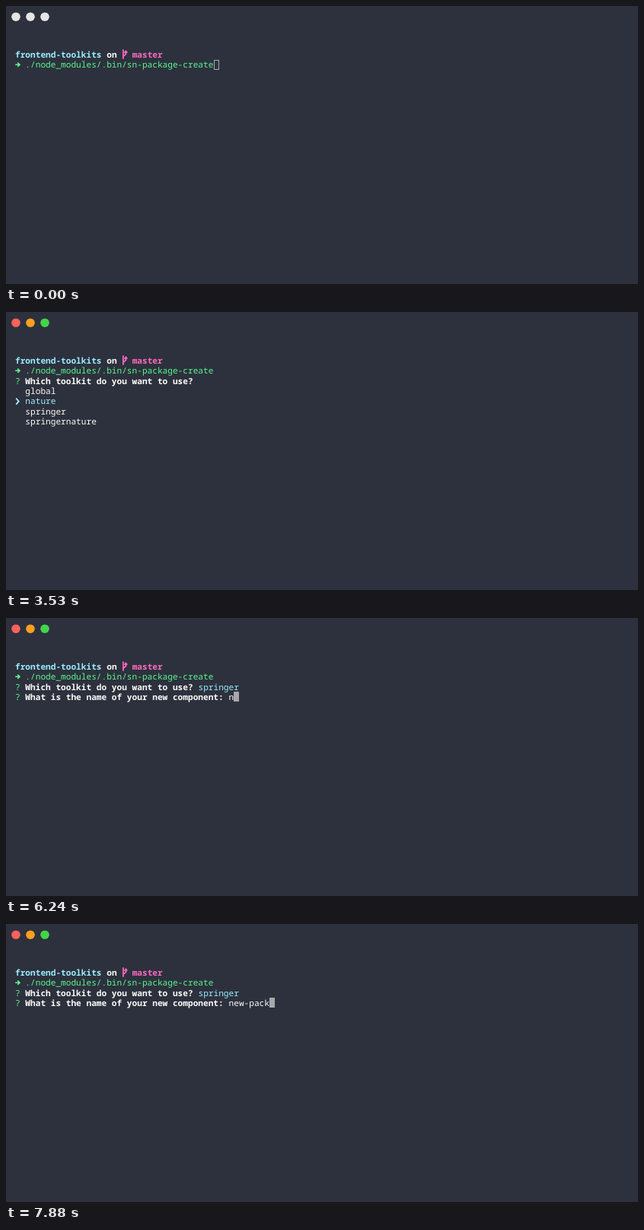
These frames come from a looping animation (830x366 px, 8 s). An HTML page:

```html
<!DOCTYPE html>
<html lang="en">
<head>
<meta charset="utf-8">
<title>Terminal</title>
<style>
html, body { margin: 0; width: 100%; height: 100%; overflow: hidden; background: #2d313d; }
svg { display: block; width: 830px; height: 366px; }
text { font: 500 11.13px "Noto Sans Mono", "DejaVu Sans Mono", monospace; white-space: pre; text-rendering: geometricPrecision; font-variant-ligatures: none; }
.bold { font-weight: 700; }
.light { font-weight: 400; }
</style>
</head>
<body>
<svg id="stage" viewBox="0 0 830 366"></svg>
<script>
const LOOP = 8000, LEFT = 12, CELL = 6.68, TOP = 68, ROW = 13.33;
const CYAN = '#9aedfe', GREEN = '#5af78e', PINK = '#ff6ac1', WHITE = '#fbfbf8', GREY = '#92949a', BLOCK = '#a7a8ab';
const stage = document.getElementById('stage');
const colX = col => LEFT + col * CELL;
const rowY = row => TOP + row * ROW;

function add(parent, tag, attrs, content) {
  const el = document.createElementNS('http://www.w3.org/2000/svg', tag);
  for (const key in attrs) el.setAttribute(key, attrs[key]);
  if (content) el.textContent = content;
  return parent.appendChild(el);
}
const group = () => add(stage, 'g', {});
const write = (g, row, col, str, fill, cls = '') =>
  add(g, 'text', { x: colX(col), y: rowY(row), fill, class: cls }, str);
const show = (el, on) => el.setAttribute('visibility', on ? 'visible' : 'hidden');

// window buttons
const dots = ['#ff6259', '#ff9f1f', '#42d449'].map((color, i) => ({
  color, el: add(stage, 'circle', { cx: 13 + 19 * i, cy: 14.2, r: 5.8 })
}));

// prompt
const prompt = group();
write(prompt, 0, 0, 'frontend-toolkits', CYAN, 'bold');
write(prompt, 0, 18, 'on', WHITE, 'bold');
write(prompt, 0, 23, 'master', PINK, 'bold');
add(prompt, 'path', { d: 'M153.9 57.2V69.8M154 66.4L157.4 63.4V59.4M155.6 61.6L157.4 59.4L159.2 61.6', fill: 'none', stroke: PINK, 'stroke-width': 1.7 });
add(prompt, 'path', { d: 'M12.2 77.3H17.2M15.2 74.7L18 77.3L15.2 79.9', fill: 'none', stroke: GREEN, 'stroke-width': 1.6 });
write(prompt, 1, 2, './node_modules/.bin/sn-package-create', GREEN);

// toolkit question
const question = group();
write(question, 2, 0, '?', GREEN);
write(question, 2, 2, 'Which toolkit do you want to use?', WHITE, 'bold');
const hint = write(question, 2, 36, '(Use arrow keys)', GREY, 'light');
const answer = write(question, 2, 36, 'springer', CYAN);

const menu = group();
const options = ['global', 'nature', 'springer', 'springernature']
  .map((name, i) => write(menu, 3 + i, 2, name, WHITE));
const pointer = add(menu, 'path', { d: 'M13.2 -7.6L16.8 -3.6L13.2 0.4', fill: 'none', stroke: CYAN, 'stroke-width': 1.8 });

// name question
const naming = group();
write(naming, 3, 0, '?', GREEN);
write(naming, 3, 2, 'What is the name of your new component:', WHITE, 'bold');
const typed = write(naming, 3, 42, '', WHITE);

const cursor = add(stage, 'rect', {});
function placeCursor(row, col, filled) {
  const inset = filled ? 0 : 0.5;
  const box = {
    x: Math.round(colX(col)) + inset, y: Math.round(rowY(row) - 10.6) + inset,
    width: 7 - 2 * inset, height: 13 - 2 * inset,
    fill: filled ? BLOCK : 'none', stroke: filled ? 'none' : BLOCK
  };
  for (const key in box) cursor.setAttribute(key, box[key]);
}

const WORD = 'new-pack';
const KEYS = [6240, 6410, 6470, 7000, 7240, 7530, 7710, 7880];
const FOCUS = 60, RUN = 1000, ASK = 2940, DOWN = [3530, 4060], CHOOSE = 5060;

function draw(t) {
  const asked = t >= ASK, chosen = t >= CHOOSE;
  const pick = DOWN.filter(at => t >= at).length;
  const count = KEYS.filter(at => t >= at).length;

  dots.forEach(d => d.el.setAttribute('fill', t < FOCUS ? '#e5e5e3' : d.color));
  show(question, asked);
  show(hint, asked && pick === 0);
  show(answer, chosen);
  show(menu, asked && !chosen);
  options.forEach((el, i) => el.setAttribute('fill', i === pick ? CYAN : WHITE));
  pointer.setAttribute('transform', `translate(0 ${rowY(3 + pick)})`);
  show(naming, chosen);
  typed.textContent = WORD.slice(0, count);

  show(cursor, !asked || chosen);
  if (chosen) placeCursor(3, 42 + count, true);
  else if (t >= RUN) placeCursor(2, 0, true);
  else placeCursor(1, 39, t >= 2 * FOCUS);
}

const start = performance.now();
function tick() {
  draw((performance.now() - start) % LOOP);
  requestAnimationFrame(tick);
}
draw(0);
requestAnimationFrame(tick);
</script>
</body>
</html>
```
